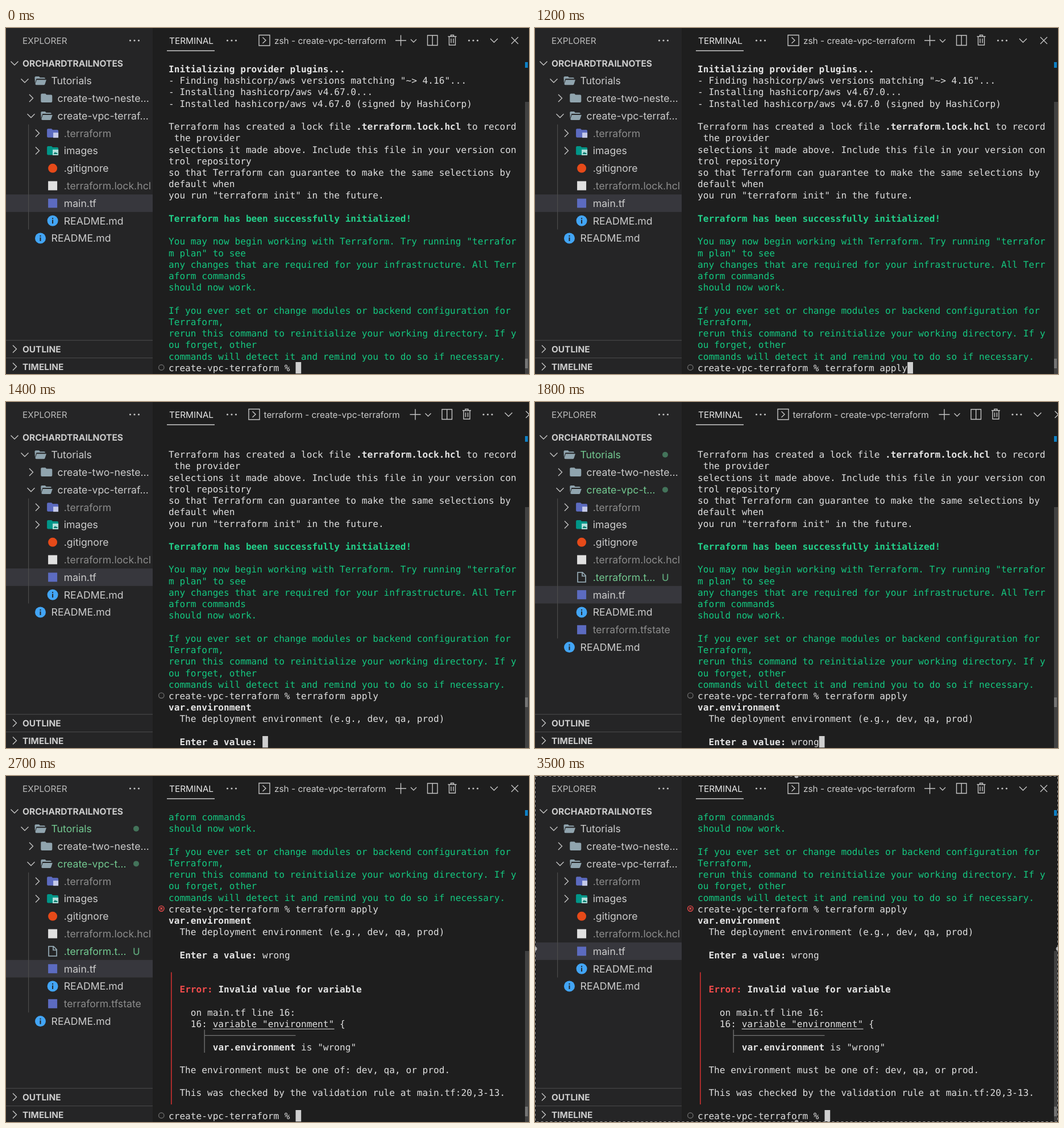
Write an HTML page that moves like this. It is 920 by 609 pixels and loops after 3.77 s.

```html
<!DOCTYPE html>
<html lang="en">
<head>
<meta charset="utf-8">
<title>Terminal session</title>
<style>
html, body { margin: 0; width: 100%; height: 100%; overflow: hidden; background: #1e1e1e; }
svg { display: block; width: 920px; height: 609px; }
text { font-family: Inter, "Open Sans", sans-serif; text-rendering: geometricPrecision; }
.term { font: 16.14px "DejaVu Sans Mono", "Liberation Mono", monospace; fill: #dedede; }
.term .b { font-weight: 700; fill: #e5e5e5; }
.term .r { font-weight: 700; fill: #f14c4c; }
.term.green { fill: #14c880; }
.term.green .b { fill: #23d18b; }
.ln { fill: none; stroke: #c5c5c5; stroke-width: 1.4; }
</style>
</head>
<body>
<svg id="stage" viewBox="0 0 920 609"></svg>
<script>
const LOOP = 3770, COL = 9.717, LINE = 20.23, LEFT = 286, TOP = 62.2, ROWS = 27;
const PROMPT = 'create-vpc-terraform % ', COMMAND = 'terraform apply', ANSWER = 'wrong';
const ASK = '  *Enter a value:* ';

// *bold*, ^red^
const intro = `*Initializing provider plugins...*
- Finding hashicorp/aws versions matching "~> 4.16"...
- Installing hashicorp/aws v4.67.0...
- Installed hashicorp/aws v4.67.0 (signed by HashiCorp)

Terraform has created a lock file *.terraform.lock.hcl* to record
 the provider
selections it made above. Include this file in your version con
trol repository
so that Terraform can guarantee to make the same selections by
default when
you run "terraform init" in the future.

*Terraform has been successfully initialized!*

You may now begin working with Terraform. Try running "terrafor
m plan" to see
any changes that are required for your infrastructure. All Terr
aform commands
should now work.

If you ever set or change modules or backend configuration for
Terraform,
rerun this command to reinitialize your working directory. If y
ou forget, other
commands will detect it and remind you to do so if necessary.`.split('\n');

const question = ['*var.environment*', '  The deployment environment (e.g., dev, qa, prod)', ''];

const failure = `

  ^Error:^ *Invalid value for variable*

    on main.tf line 16:
    16: variable "environment" {

        *var.environment* is "wrong"

  The environment must be one of: dev, qa, or prod.

  This was checked by the validation rule at main.tf:20,3-13.
`.split('\n');

const path = (d, attrs = '') => `<path class="ln" d="${d}" ${attrs}/>`;
const rect = (x, y, w, h, fill) => `<rect x="${x}" y="${y}" width="${w}" height="${h}" fill="${fill}"/>`;
const dot = (x, y, r, fill) => `<circle cx="${x}" cy="${y}" r="${r}" fill="${fill}"/>`;
const label = (x, y, s, size, fill, attrs = '') =>
  `<text x="${x}" y="${y + size * .36}" font-size="${size}" fill="${fill}" ${attrs}>${s}</text>`;
const down = (x, y, r = 6.5) => path(`M${x - r} ${y - r / 2}l${r} ${r} ${r} ${-r}`);
const right = (x, y) => path(`M${x - 3} ${y - 6.5}l6.5 6.5 -6.5 6.5`);
const dots = (x, y) => [-7.5, 0, 7.5].map(d => dot(x + d, y, 1.6, '#c5c5c5')).join('');
const at = (x, y, s) => `<g transform="translate(${x} ${y})">${s}</g>`;

const folder = fill =>
  `<path fill="${fill}" d="M-8-8h6l2 2h8q2 0 2 2v9.500q0 2-2 2h-16q-2 0-2-2v-11.500q0-2 2-2z"/>`;
const icons = {
  closed: folder('#90a4ae'),
  open: '<path fill="#90a4ae" d="M-10-5.500q0-2 2-2h5.500l2 2h7q2 0 2 2h-15.500l-2.500 8zM-6.500-1.500h17l-2.500 7.500q-.5 1.500-2 1.500h-13q-2 0-2-2z"/>',
  tool: folder('#5c6bc0') + rect(1, -1, 9, 9, '#c5cae9'),
  images: folder('#009688') + rect(0, -2, 10, 10, '#b2dfdb') + '<path fill="#00796b" d="M1.500 6l2.500-4 2 2 1-1 2 3z"/>',
  git: dot(0, 0, 8, '#e64a19'),
  lock: rect(-8, -8, 16, 16, '#e0e0e0'),
  tf: rect(-8, -8, 16, 16, '#5c6bc0'),
  info: dot(0, 0, 9.5, '#42a5f5') + rect(-1, -1.5, 2, 6.5, '#252526') + rect(-1, -5, 2, 2, '#252526'),
  file: path('M-7-8.500h8.500l5.500 5.500v11.500h-14zM1-8v6h6', 'style="stroke:#90a4ae;stroke-width:1.8"')
};

function sidebar(changed) {
  const text = '#cccccc', dim = '#8c8c8c', added = '#73c991', mark = changed ? added : text;
  // depth, arrow, icon, name, colour, badge
  const tree = [
    [0, down, 'open', 'Tutorials', mark, changed && 'dot'],
    [1, right, 'closed', 'create-two-neste…', text],
    [1, down, 'open', changed ? 'create-vpc-t…' : 'create-vpc-terraf…', mark, changed && 'dot'],
    [2, right, 'tool', '.terraform', dim],
    [2, right, 'images', 'images', text],
    [2, null, 'git', '.gitignore', text],
    [2, null, 'lock', '.terraform.lock.hcl', dim],
    changed && [2, null, 'file', '.terraform.t…', added, 'U'],
    [2, null, 'tf', 'main.tf', text],
    [2, null, 'info', 'README.md', text],
    changed && [2, null, 'tf', 'terraform.tfstate', dim],
    [0, null, 'info', 'README.md', text]
  ].filter(Boolean);
  const rowY = i => 62 + 30.8 * i;
  let s = rect(0, 0, 258, 609, '#252526') + label(29, 22, 'EXPLORER', 15.4, '#bbbbbb') + dots(226, 22)
    + down(15, 62) + label(29, 62, 'ORCHARDTRAILNOTES', 15.6, '#cccccc', 'font-weight="700"');
  tree.forEach(([depth, arrow, icon, name, fill, badge], i) => {
    const y = rowY(i + 1);
    if (name === 'main.tf') s += rect(0, y - 15.4, 258, 30.8, '#37373d');
    if (arrow) s += arrow(33 + 11 * depth, y);
    s += at(60.5 + 10.8 * depth, y, icons[icon]) + label(79.5 + 11.1 * depth, y, name, 17.7, fill);
    if (badge === 'dot') s += dot(229, y, 5, '#43735a');
    if (badge === 'U') s += label(223, y, 'U', 17, '#5da579', 'font-weight="500"');
  });
  s += rect(39, rowY(3.5), 1.2, rowY(tree.length - .5) - rowY(3.5), '#4b4b4b');
  [['OUTLINE', 565], ['TIMELINE', 596]].forEach(([name, y]) => {
    s += rect(0, y - 16, 258, 1.3, '#434344') + right(15, y) + label(29, y, name, 15.4, '#cccccc', 'font-weight="700"');
  });
  return s;
}

function header(running) {
  const d = running ? 25.5 : 0, x = running ? 427 : 445;
  const trash = 'M777.500 15h15M782.500 15v-2.500h5v2.500M779.500 15v15h11v-15M783 18.500v8M787 18.500v8';
  return label(287, 22, 'TERMINAL', 15.4, '#e7e7e7') + rect(283, 39.3, 84, 1.4, '#d7d7d7') + dots(397, 22)
    + path(`M${x} 12.500h19v18.500h-19zM${x + 6.5} 16.500l5.500 5.300 -5.500 5.300`)
    + label(running ? 453.5 : 472, 22, (running ? 'terraform' : 'zsh') + ' - create-vpc-terraform', 15.4, '#cccccc')
    + at(d, 0, path('M685 22h19M694.500 12.500v19') + down(717, 22.5, 5)
      + path('M741.500 13h17.500v17.500h-17.500zM750.200 13v17.500') + path(trash) + dots(822, 22)
      + down(858.5, 22) + path('M889 16l12 12M901 16l-12 12'));
}

// Buffer, cursor column and scrollbar top at time t
function session(t) {
  const step = Math.floor(t / 100);
  const typed = COMMAND.slice(0, Math.round(step * 1.25));
  const lines = [...intro, PROMPT + typed];
  if (t < 1300) return { lines, col: PROMPT.length + typed.length, bar: 130 };
  if (t < 1400) return { lines: [...lines, ''], col: 0, bar: 144 };
  const answer = ANSWER.slice(0, Math.ceil((step - 14) * 1.25));
  lines.push(...question, ASK + answer);
  if (t < 2100) return { lines, col: 17 + answer.length, bar: 185 };
  if (t < 2700) return { lines: [...lines, '', ''], col: 0, bar: 208 };
  return { lines: [...lines, ...failure, PROMPT], col: PROMPT.length, bar: 308 };
}

const markup = s => s.replace(/ /g, '\u00a0').replace(/>/g, '&gt;')
  .replace(/\*(.+?)\*/g, '<tspan class="b">$1</tspan>')
  .replace(/\^(.+?)\^/g, '<tspan class="r">$1</tspan>');

function terminal(t) {
  const { lines, col, bar } = session(t), first = lines.length - ROWS, failed = t >= 2700;
  const rowY = i => TOP + (i - first) * LINE;
  const colX = c => LEFT + c * COL;
  const ring = (i, color, extra = '') =>
    at(273.3, rowY(i) + 9.3, `<circle class="ln" r="4.700" style="stroke:${color}"/>` + extra);
  const prompt = intro.length, last = lines.length - 1;
  let s = rect(colX(col), rowY(last) - .2, COL, LINE, '#cfcfcf');
  for (let i = first; i <= last; i++) {
    const green = i > 12 && i < prompt ? ' green' : '';
    s += `<text class="term${green}" x="${LEFT}" y="${rowY(i) + 15.7}">${markup(lines[i])}</text>`;
  }
  if (failed) {
    const top = prompt + 6, mid = y => rowY(y) + LINE / 2, x = colX(6.5);
    s += ring(prompt, '#f14c4c', path('M-2-2l4 4M2-2l-4 4', 'style="stroke:#f14c4c"')) + ring(last, '#6a6a6a')
      + rect(colX(.5) - .8, mid(top) - LINE / 2, 1.6, mid(last - 1) - mid(top) + LINE / 2, '#cd3131')
      + rect(colX(8), rowY(top + 4) + 18.4, 22 * COL, 1.1, '#d4d4d4')
      + path(`M${x} ${rowY(top + 5)}V${rowY(top + 7)}M${x} ${mid(top + 5)}H${colX(23)}`, 'style="stroke:#767676;stroke-width:1.300"');
  } else s += ring(prompt, '#6a6a6a');
  const markY = failed || t < 1300 ? 582 : t < 2100 ? 520 : 496;
  return s + rect(913, bar, 7, 609 - bar, '#424242') + rect(913, 60, 5, 10, '#0d7fc4') + rect(913, markY, 5, 17, '#747474');
}

function selection() {
  const handles = [[460, 0], [460, 609], [0, 304], [920, 304]];
  return '<rect x=".5" y=".5" width="919" height="608" fill="none" stroke="#111"/>'
    + '<rect x=".5" y=".5" width="919" height="608" fill="none" stroke="#a0a0a0" stroke-dasharray="4 4"/>'
    + handles.map(([x, y]) => dot(x, y, 3.5, '#b5b5b5')).join('');
}

const stage = document.getElementById('stage');
let shown = '';
function draw() {
  const t = performance.now() % LOOP;
  const view = rect(0, 0, 920, 609, '#1e1e1e') + sidebar(t >= 1600 && t < 2900)
    + header(t >= 1400 && t < 2700) + terminal(t) + (t >= 3200 ? selection() : '');
  if (view !== shown) stage.innerHTML = shown = view;
  requestAnimationFrame(draw);
}
draw();
</script>
</body>
</html>
```
